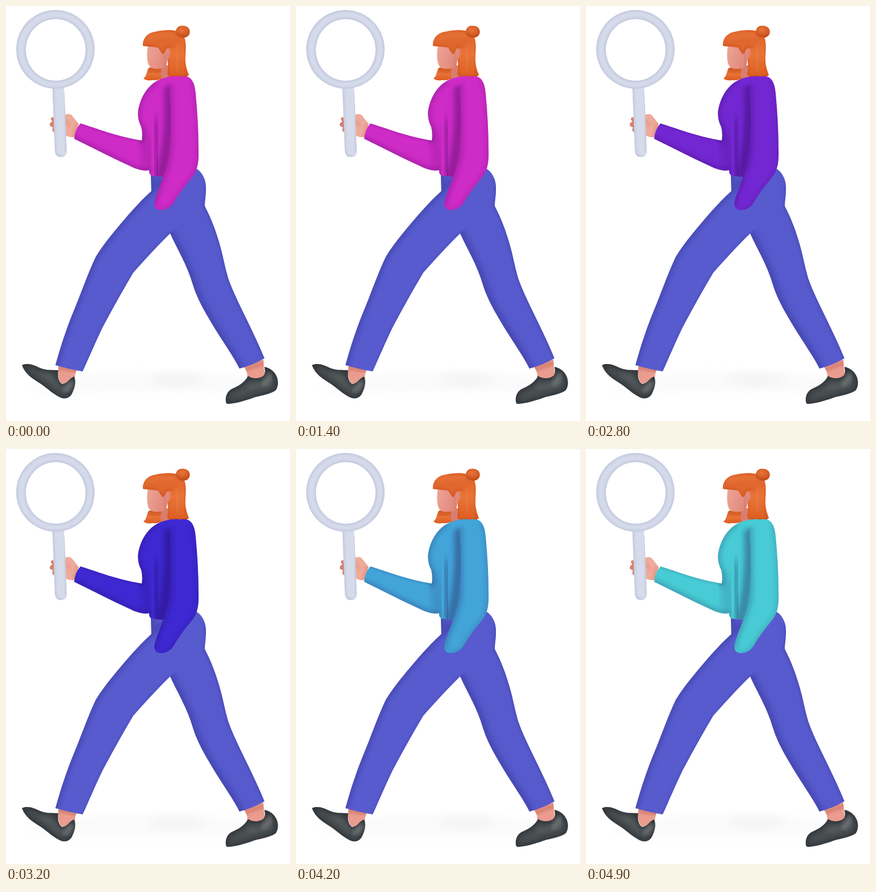
Write an HTML page that moves like this. It is 500x728 px and loops after 5 s.

```html
<!DOCTYPE html>
<html lang="en">
<head>
<meta charset="utf-8">
<title>Walking with a magnifying glass</title>
<style>
  html, body { margin: 0; width: 100%; height: 100%; overflow: hidden; background: #fff; }
  svg { display: block; width: 100vw; height: 100vh; }
  .top { fill: var(--top); }
</style>
</head>
<body>
<svg id="stage" viewBox="0 0 500 728" xmlns="http://www.w3.org/2000/svg">
  <defs>
    <filter id="soft2" x="-50%" y="-50%" width="200%" height="200%"><feGaussianBlur stdDeviation="2"/></filter>
    <filter id="soft4" x="-50%" y="-50%" width="200%" height="200%"><feGaussianBlur stdDeviation="4"/></filter>
    <filter id="soft9" x="-50%" y="-50%" width="200%" height="200%"><feGaussianBlur stdDeviation="9"/></filter>
    <linearGradient id="floor" x1="0" y1="0" x2="0" y2="1">
      <stop offset="0" stop-color="#f8f8f8"/><stop offset="1" stop-color="#fff"/>
    </linearGradient>
    <linearGradient id="face" x1="0" y1="0" x2="1" y2="0.3">
      <stop offset="0" stop-color="#eda596"/><stop offset="1" stop-color="#df8578"/>
    </linearGradient>
    <linearGradient id="hair" x1="0" y1="0" x2="0" y2="1">
      <stop offset="0" stop-color="#dd6026"/><stop offset=".5" stop-color="#e97438"/><stop offset="1" stop-color="#dc5c20"/>
    </linearGradient>
    <radialGradient id="bun" cx=".42" cy=".35" r=".7">
      <stop offset="0" stop-color="#e8733a"/><stop offset="1" stop-color="#cc521b"/>
    </radialGradient>
  </defs>
</svg>
<script>
const NS = 'http://www.w3.org/2000/svg';
const stage = document.getElementById('stage');
const defs = stage.querySelector('defs');
let count = 0;

function add(parent, tag, attrs) {
  const el = document.createElementNS(NS, tag);
  for (const key in attrs) el.setAttribute(key, attrs[key]);
  return parent.appendChild(el);
}

// A filled outline with blurred strokes inside it: [path, colour, width, opacity, blur]
function part(d, paint, shades = []) {
  const id = 'clip' + count++;
  add(add(defs, 'clipPath', { id }), 'path', { d, 'clip-rule': 'evenodd' });
  add(stage, 'path', { d, 'fill-rule': 'evenodd', ...(paint ? { fill: paint } : { class: 'top' }) });
  const group = add(stage, 'g', { 'clip-path': `url(#${id})` });
  for (const [line, stroke, width, opacity, blur] of shades) {
    add(group, 'path', {
      d: line || d, fill: 'none', stroke, opacity,
      'stroke-width': width, 'stroke-linecap': 'round', filter: `url(#soft${blur})`
    });
  }
}

const skin = '#ea9c8e', skinDark = '#c0604f', navy = '#2d2d8c', dark = '#1c0040';

// Floor
add(stage, 'ellipse', { cx: 255, cy: 668, rx: 215, ry: 24, fill: 'url(#floor)', filter: 'url(#soft9)' });
add(stage, 'ellipse', { cx: 300, cy: 656, rx: 50, ry: 10, fill: '#f3f3f3', filter: 'url(#soft9)' });

// Ankles and shoes
part('M93 628L127 634Q121 642 121 655Q110 668 97 661Q89 652 93 628Z', skin,
  [['M92 634L124 640', skinDark, 8, .4, 2]]);
part('M418 632L453 620Q454 636 456 650Q440 660 425 650Q425 640 418 632Z', skin,
  [['M420 638L454 626', skinDark, 8, .4, 2]]);
part('M28 630C38 625 50 630 60 635C72 640 82 638 92 639C90 650 93 660 99 663C108 663 112 652 120 650C124 660 121 671 115 682C110 689 102 690 94 686C82 680 72 670 60 662C46 653 34 646 28 630Z',
  '#4a4f52', [['', '#1e2326', 7, .7, 4], ['M64 645Q82 652 94 668', '#6d7374', 7, .4, 4],
              ['M104 673Q112 668 115 661', '#85898b', 9, .7, 4]]);
part('M387 693C386 684 390 676 397 672C409 667 421 660 426 649C435 655 447 654 454 648C457 643 456 638 455 633C465 635 473 641 477 651C480 660 479 668 475 674C464 682 448 683 436 687C420 693 404 697 391 698Q387 698 387 693Z',
  '#4a4f52', [['', '#1e2326', 7, .7, 4], ['M426 670Q440 668 452 662', '#6d7374', 7, .4, 4],
              ['M454 663Q462 658 464 649', '#85898b', 9, .7, 4]]);

// Trousers: rear leg with hips, then the front leg over them
const backLeg = 'M255 296L333 284C345 290 353 304 352 322C352 334 350 342 350 351C361 372 369 393 376 417C382 437 385 457 391 477C405 517 432 562 455 618Q435 630 411 636C399 612 381 588 366 563C351 538 337 515 329 489C319 454 301 426 289 399L256 330Z';
const frontLeg = 'M272 311L335 296C340 335 325 365 289 399C265 422 244 446 224 468C205 500 187 532 170 564C157 591 147 615 135 641Q110 637 87 630C97 594 108 561 122 528C135 496 146 465 158 440C174 414 199 385 221 360C238 341 254 325 272 311Z';
part(backLeg, '#575acc', [
  ['M255 297V328M258 322L276 308', navy, 14, .35, 4],
  ['M289 399C301 426 319 454 329 489C337 515 351 538 366 563Q389 598 411 636', navy, 16, .38, 4],
  ['M352 304Q353 335 350 351C361 372 369 393 376 417C382 437 385 457 391 477C405 517 432 562 455 618', navy, 5, .3, 2]
]);
part(frontLeg, '#585bcd', [
  ['M272 311C254 325 238 341 221 360C199 385 174 414 158 440C146 465 135 496 122 528C108 561 97 594 87 630', navy, 9, .42, 4],
  ['M289 399C265 422 244 446 224 468C205 500 187 532 170 564C157 591 147 615 135 641', navy, 4, .22, 2]
]);

// Hand behind the handle
part('M87 196Q79 193 79 199L82 203Q76 204 77 210L83 213Q79 219 85 222L91 224V196Z', '#dc8475',
  [['M79 202L90 205M78 212L90 214', '#a94b40', 2, .6, 2]]);
part('M99 196C104 188 114 188 117 193L128 207L121 230Q110 231 103 226Z', '#eeaa9a',
  [['M125 207L119 229', skinDark, 4, .3, 2], ['M104 201Q110 205 112 210', skinDark, 3, .25, 2]]);

// Neck and hair
part('M270 104H293V127Q284 135 270 129Z', '#d87d6f', [['M275 104V126', '#ae4d3e', 6, .3, 4]]);
part('M241 70C240 57 249 47 263 45C281 41 299 41 309 48C318 55 317 72 316 87C315 102 318 111 322 121Q313 130 297 124Q289 127 284 120C285 112 286 99 284 88L274 73Z',
  'url(#hair)', [['M316 67Q315 104 321 122', '#a83c0d', 5, .3, 4], ['M286 87Q288 108 285 122', '#b3410f', 5, .35, 4],
                 ['M301 76Q302 94 302 108', '#f08a50', 9, .45, 4], ['M287 122Q304 125 320 122', '#b3410f', 5, .35, 2]]);
part('M242 127C249 122 247 113 252 108L274 107Q271 122 274 126Q270 131 258 130Q247 132 242 127Z',
  'url(#hair)', [['M252 110Q262 119 273 112', '#a93b10', 6, .4, 4]]);

// Face, ear, fringe and bun
part('M250 69C248 80 247 96 252 105Q257 111 268 110Q277 110 282 106L285 94Q291 86 289 77Q286 72 280 78L273 70Z',
  'url(#face)', [['M280 81Q281 96 279 109', '#bd5c4a', 6, .3, 4]]);
part('M241 70C240 56 252 46 266 45C287 42 303 46 307 60L294 75Q287 70 282 75Q279 86 275 84Q271 78 268 73Q252 71 241 70Z',
  '#e0672e', [['M242 70Q265 71 269 75Q274 86 279 82Q282 72 289 72', '#b44211', 4, .4, 2],
              ['M251 57Q270 48 296 52', '#f08748', 6, .5, 4]]);
part('M299 44C300 36 307 33 315 35C323 37 325 44 323 49C320 56 311 57 306 54Q299 52 299 44Z',
  'url(#bun)', [['M299 49Q308 57 321 52', '#a73d0d', 5, .4, 2]]);

// Jumper
part('M263 133C274 126 287 123 302 123L325 129L332 260Q305 288 287 300Q269 300 255 297Q251 293 252 288C243 290 231 287 221 282C190 268 155 250 120 233Q121 217 131 206C158 214 195 229 239 236Q241 224 238 212C233 203 231 191 233 181C237 161 247 143 263 133Z',
  '', [
    ['M263 133C247 143 237 161 233 181Q231 201 238 212Q242 225 239 236', dark, 7, .25, 4],
    ['M120 233C155 250 190 268 221 282Q240 291 252 288', dark, 8, .25, 4],
    ['M131 206C158 214 195 229 239 236', dark, 4, .16, 2],
    ['M240 222Q252 250 250 285', dark, 12, .22, 9],
    ['M263 212Q267 250 266 292', dark, 36, .2, 9],
    ['M287 148C289 200 287 243 273 299', dark, 18, .32, 4],
    ['M255 299H286', dark, 6, .22, 2]
  ]);
part('M292 132Q307 119 322 125C330 130 333 141 334 154C337 186 339 219 339 253C340 277 336 291 327 301C317 313 304 329 296 344C290 354 281 358 273 358Q262 358 261 347C262 337 267 326 271 315C276 300 286 280 288 260C291 230 290 194 290 172Q286 146 292 132Z',
  '', [
    ['M328 133Q334 142 334 154C337 186 339 219 339 253C340 277 336 291 327 301C317 313 304 329 296 344Q289 358 273 358', dark, 5, .22, 4],
    ['M289 140C288 170 291 230 288 260C286 280 276 300 271 315Q262 335 261 348', dark, 9, .22, 4]
  ]);

// Magnifying glass
const glass = '#d6dbeb', steel = '#9299ba';
part('M80 139Q91 134 104 139Q101 146 103 154L107 255Q107 265 97 265Q87 265 86 255L82 154Q82 145 80 139Z', glass, [
  ['M82 143L86 255Q88 265 98 265', steel, 4, .35, 2],
  ['M104 147L107 255', steel, 4, .35, 2]
]);
part('M18 76A69 69 0 1 0 156 76A69 69 0 1 0 18 76ZM35 77A52.5 54 0 1 1 140 77A52.5 54 0 1 1 35 77Z', glass, [
  ['', steel, 4, .38, 2]
]);

// Jumper colour: [ms, r, g, b], refreshed every 100 ms
const LOOP = 5000, STEP = 100;
const tints = [
  [0, 207, 43, 199], [1400, 207, 43, 199], [1900, 197, 41, 204],
  [2400, 167, 38, 209], [3200, 62, 40, 210], [3700, 65, 97, 204],
  [4200, 67, 164, 217], [4900, 72, 203, 213]
];

function tintAt(ms) {
  const i = tints.findIndex(k => k[0] >= ms);
  if (i < 1) return tints[0].slice(1);
  const a = tints[i - 1], b = tints[i];
  const p = (ms - a[0]) / (b[0] - a[0]);
  return [1, 2, 3].map(n => Math.round(a[n] + (b[n] - a[n]) * p));
}

const start = performance.now();
function draw(now) {
  const ms = Math.floor((Math.max(0, now - start) % LOOP) / STEP) * STEP;
  stage.style.setProperty('--top', `rgb(${tintAt(ms)})`);
  requestAnimationFrame(draw);
}
draw(start);
</script>
</body>
</html>
```
